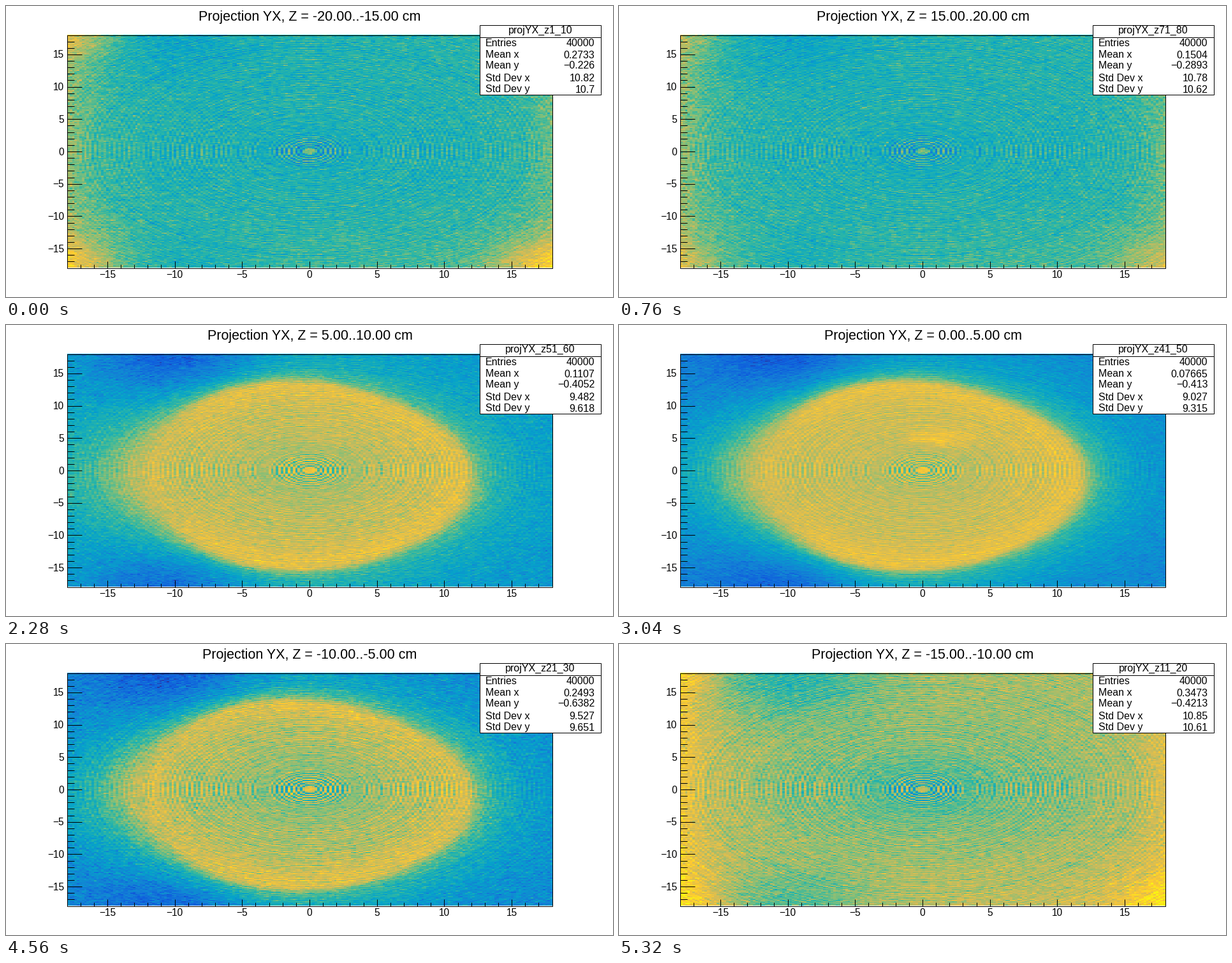
Recreate the animation shown at these times as a matplotlib script. Size 952x456 px, loop 6.08 s.

```python
import numpy as np
import matplotlib.pyplot as plt
from matplotlib.animation import FuncAnimation
from matplotlib.colors import LinearSegmentedColormap
from matplotlib.patches import Rectangle

W, H, DPI = 952, 456, 64
PX = 72 / DPI
LEFT, RIGHT, TOP, BOTTOM = 95.5, 856.5, 45.5, 410.5
BINS, HALF = 200, 18
STEP_MS = 760
SLICES, SLAB_CM, SLAB_BINS = 8, 5, 10

plt.rcParams["font.family"] = "Liberation Sans"

bird = LinearSegmentedColormap.from_list("bird", list(zip(
    [0.2082, 0.0592, 0.0780, 0.0232, 0.1802, 0.5301, 0.8186, 0.9956, 0.9764],
    [0.1664, 0.3599, 0.5041, 0.6419, 0.7178, 0.7492, 0.7328, 0.7862, 0.9832],
    [0.5293, 0.8684, 0.8385, 0.7914, 0.6425, 0.4662, 0.3499, 0.1968, 0.0539])), N=255)

# mean x, mean y, std dev x, std dev y of each slice
STATS = ["0.2733 −0.226 10.82 10.7", "0.1504 −0.2893 10.78 10.62",
         "0.1421 −0.3831 10.16 10.1", "0.1107 −0.4052 9.482 9.618",
         "0.07665 −0.413 9.027 9.315", "0.1418 −0.5217 9.214 9.427",
         "0.2493 −0.6382 9.527 9.651", "0.3473 −0.4213 10.85 10.61"]

cells = (np.arange(BINS) + .5) * 2 * HALF / BINS - HALF
X, Y = np.meshgrid(cells, cells)


def bump(cx, cy, sx, sy):
    return np.exp(-((X - cx) / sx) ** 2 / 2 - ((Y - cy) / sy) ** 2 / 2)


def ring_pattern():
    """Concentric rings one bin wide, which alias on the bin grid."""
    rng = np.random.default_rng(7)
    r = np.hypot(X, Y) * BINS / (2 * HALF)
    radii = np.arange(160)
    swell = np.convolve(rng.normal(0, 1, 160), np.ones(4) / 4, "same")
    fine = np.interp(r, radii, rng.normal(0, .25, 160))
    axis = np.exp(-(Y / 1.6) ** 2 - (r / 60) ** 2)
    fade = .8 * np.exp(-r / 14) + .26 + .35 * axis
    wave = .5 * np.sin(np.pi * r) + .5 * (1 - 2 * (np.floor(r) % 2))
    wave *= .85 + .6 * np.interp(r, radii, swell)
    return np.where(r < 2.8, 0, fade * (wave + fine))


def body_distance():
    """Distance to the edge of a tilted egg along rays, negative inside."""
    dx, dy = X - .2, Y + .9
    t = np.arctan2(dy / 14.5, dx / 11.8)
    edge = 1 - .14 * np.cos(t) * np.sin(t) ** 2 - .012 * np.sin(2 * t)
    q = np.hypot(dx / 11.8, dy / 14.5) / edge
    return np.hypot(dx, dy) * (1 - 1 / q), np.arctan2(dy, dx)


RINGS = ring_pattern()
CORE = np.hypot(X, Y) < .5
DIST, angle = body_distance()
WEST = np.exp(-(np.pi - np.abs(angle)) ** 2 / .35)
INSIDE = 1 / (1 + np.exp(np.clip(DIST / (.35 + .9 * WEST), -40, 40)))
LOBE = bump(-11, -.5, 4.6, 5)
BLOBS = bump(-10, 17.5, 4.2, 4.5) + .9 * bump(-10, -18, 4.2, 4)


def slab(i):
    """Slab index along z: the lowest slab first, then from the top down."""
    return -i % SLICES


def backdrop(s, glow):
    """Slices beyond the body: flat centre, bright edges and corners."""
    v = .47 + .2 * glow - (.08 + .12 * glow) * BLOBS
    v += .19 * np.exp(-(X + HALF) / 2.3) + .12 * np.exp(-(HALF - X) / 2.2)
    corner = .18 * bump(-18, 18, 2.6, 2.6) + .2 * bump(-18, -18, 3, 3.5)
    corner += .28 * bump(18, -18, 3.2, 3.2)
    return v + (abs(s) - 1) * corner + .05 * np.clip((-Y - 6) / 12, 0, 1)


def section(s):
    """Slices through the body: bright rim, halo and a lobe to the left."""
    far = .27 + .09 * s * s + .08 * s
    halo = .33 - .07 * s * s - .1 * s
    out = far + halo * np.exp(-np.maximum(DIST, 0) / 3.3)
    out += (.22 - .04 * s) * LOBE * (1 + .1 * s) - (.18 + .05 * s + .06 * s * s) * BLOBS
    out += .07 * max(s, 0) * np.exp(-(X + HALF) / 5)
    mid, rim = .73 - .05 * s * s, .86 - .02 * s * s
    inner = mid + (rim - mid) * np.exp(np.minimum(DIST, 0) / 3.3) * (1 - .85 * WEST)
    spots = bump(1, 5, 1.8, .9) + .3 * bump(-4, 2, 1.2, .8)
    v = out + (inner - out) * INSIDE
    return v + .11 * np.exp(-(s / .4) ** 2) * spots


def density(i):
    s = (slab(i) - 4) / 2       # 0 at the middle of the body
    body = abs(s) < 1.2
    glow = max(0, 1 - 2 * abs(s + 1.5))
    rng = np.random.default_rng(40 + i)
    v = section(s) if body else backdrop(s, glow)
    v -= (.03 + .03 * abs(s) * body + .1 * glow) * bump(0, 0, 6.5, 5)
    rings = .17 + .06 * s * s * body + .05 * glow
    v += rings * RINGS * (.6 + .4 * INSIDE if body else 1) + .16 * CORE
    grain = rng.normal(0, 1, (BINS, BINS + 1))
    noise = .027 + .014 * min(abs(s), 1)
    v += noise * (grain[:, 1:] + .6 * grain[:, :-1]) / 1.17
    return np.clip(v, 0, 1)


MAPS = [density(i) for i in range(SLICES)]

fig = plt.figure(figsize=(W / DPI, H / DPI), dpi=DPI, facecolor="white")
ax = fig.add_axes([0, 0, 1, 1])
image = ax.imshow(MAPS[0], cmap=bird, vmin=0, vmax=1, origin="lower", aspect="auto",
                  interpolation="nearest", extent=(LEFT, RIGHT, BOTTOM, TOP))
ax.set_xlim(0, W)
ax.set_ylim(H, 0)
ax.axis("off")


def line(x0, y0, x1, y1, z=3):
    ax.plot([x0, x1], [y0, y1], color="black", lw=PX, solid_capstyle="butt", zorder=z)


def label(x, y, s, size=16, ha="left"):
    return ax.text(x, y, s, fontsize=size * PX, ha=ha, va="baseline",
                   color="black", zorder=6)


def box(x0, y0, x1, y1, z, fill):
    ax.add_patch(Rectangle((x0, y0), x1 - x0, y1 - y0, fc=fill, ec="black",
                           lw=PX, zorder=z))


box(LEFT, TOP, RIGHT, BOTTOM, 3, "none")
for k in range(1 - HALF, HALF):
    px = LEFT + (k + HALF) * (RIGHT - LEFT) / (2 * HALF)
    py = BOTTOM - (k + HALF) * (BOTTOM - TOP) / (2 * HALF)
    major = k % 5 == 0
    line(px, BOTTOM, px, BOTTOM - (11 if major else 5.5))
    line(LEFT, py, LEFT + (23 if major else 11.5), py)
    if major:
        name = str(k).replace("-", "−")
        label(px, 425.5, name, 15.5, "center")
        label(91, py + 5.5, name, 15.5, "right")

box(742.5, 29.5, 932.5, 138.5, 5, "white")
line(742.5, 48.5, 932.5, 48.5, 6)
ROWS = (63, 81, 98, 118, 135)
for y, s in zip(ROWS, ("Entries", "Mean x", "Mean y", "Std Dev x", "Std Dev y")):
    label(752, y, s)
label(923.5, ROWS[0], "40000", ha="right")

title = label(476.5, 22.5, "", 21.5, "center")
hist = label(838, 42.5, "", 16, "center")
stats = [label(923.5, y + .5, "", ha="right") for y in ROWS[1:]]


def draw(i):
    n = slab(i)
    z = SLAB_CM * (n - SLICES // 2)
    first = SLAB_BINS * n + 1
    image.set_data(MAPS[i])
    title.set_text(f"Projection YX, Z = {z:.2f}..{z + SLAB_CM:.2f} cm")
    hist.set_text(f"projYX_z{first}_{first + SLAB_BINS - 1}")
    for t, s in zip(stats, STATS[i].split()):
        t.set_text(s)
    return [image, title, hist, *stats]


anim = FuncAnimation(fig, draw, frames=SLICES, interval=STEP_MS,
                     repeat=True, repeat_delay=0, blit=False)
plt.show()
```
